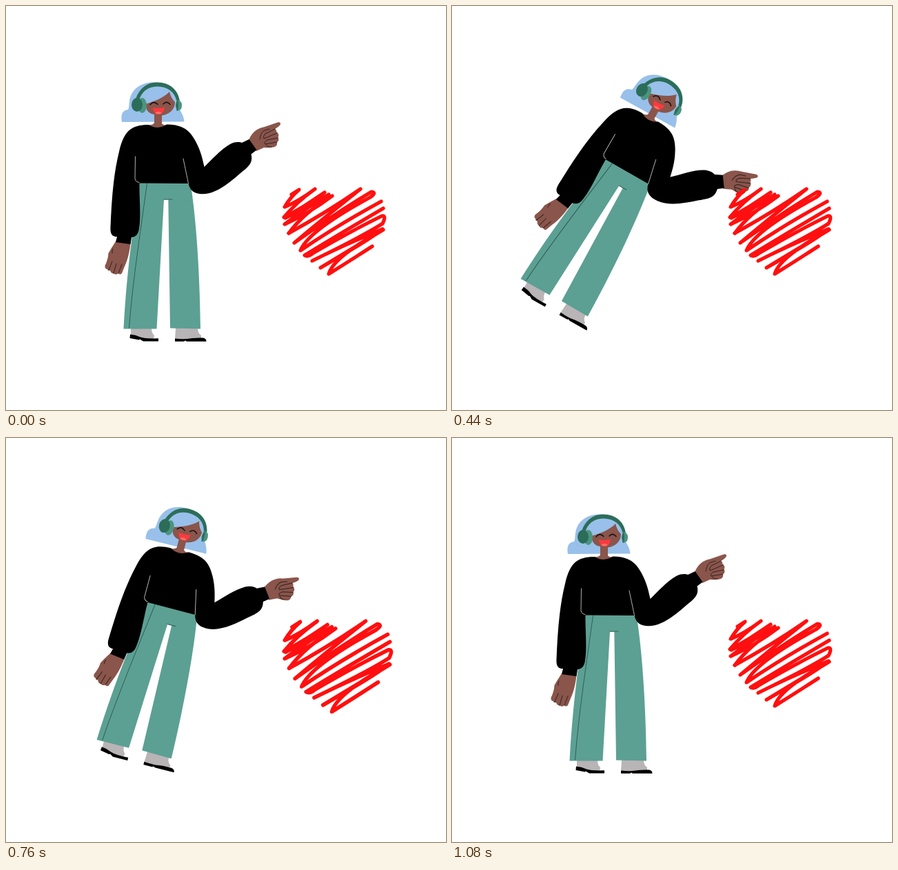
Write an HTML page that moves like this. It is 638 by 585 pixels and loops after 1120 ms.

```html
<!DOCTYPE html>
<html lang="en">
<head>
<meta charset="utf-8">
<title>Touch the heart</title>
<style>
  html, body { margin: 0; width: 100%; height: 100%; overflow: hidden; background: #fff; }
  svg { display: block; width: 638px; height: 585px; }
  .skin { fill: #8a554b; }
  .knit { fill: #000; }
  .hair { fill: #98c0ea; }
  .cloth { fill: #5ca093; }
  .sock { fill: #b9b4b6; }
  .dark { fill: #2c6d5a; }
  .pad { fill: #4b947f; }
  .line { fill: none; stroke-linecap: round; stroke-linejoin: round; }
  .crease { stroke: #2f2220; stroke-width: 1; }
  .seam { stroke: #2e5f55; stroke-width: 1; }
  .fold { stroke: #b5b0ae; stroke-width: 1; }
  .eye { stroke: #1a1110; stroke-width: 1.6; }
  .scribble { stroke: #ff0f0f; stroke-width: 5.2; }
</style>
</head>
<body>
<svg viewBox="0 0 638 585">
  <g id="figure">
    <!-- legs -->
    <path class="sock" d="M181 466H211Q211 474 215 477L214 483 181 479Z"/>
    <path class="knit" d="M180 475.500Q188 476 195 479.500 202 482 221 481.300V485.500H199L194 482.500 193 483.500 179.500 481Z"/>
    <path class="sock" d="M246 466H278Q278 474 283 477V483H245Z"/>
    <path class="knit" d="M245 481.500Q254 482.500 262 482 272 480 286 480.500 290.500 481.500 290.500 485.800H262L260 484.500 258 485.800H245Z"/>
    <path class="cloth" d="M193 254H267C275 300 281 380 282 467.500L238 466.500 235.300 280.500H229L218.500 467.500 170.500 467.500C173 420 177 380 182 340Z"/>
    <path class="line seam" d="M204.500 257C196 320 184 395 178.500 466M229 280H241"/>

    <!-- head -->
    <path class="hair" d="M168 168C166 157 169 151 177 150 179 146 178 143 179 138 181 121 195 110.500 214 110.500 236 110 248 121 250 140 250 152 257 154 258.500 167.500Z"/>
    <path class="skin" d="M202 142C215 138 229 133 237 124 239 132 242 136 245 139 245 150 237 157 226 158.500L226 170Q227 172 232 172.500L231 180H208L207 172.500Q214 172 215 169V157C208 156 203 152 202 142Z"/>
    <path class="dark" d="M188 135C193 119 205 110.500 219 110.500 238 110.500 250 122 252 138H247.500C245 125 235 116.500 219 116.500 206 117 196 124 193 137Z"/>
    <ellipse class="pad" cx="197.500" cy="144" rx="6.500" ry="11"/>
    <ellipse class="dark" cx="190" cy="143" rx="8" ry="10"/>
    <path class="pad" d="M247 136Q255 136 255 144 255 152 247 152Z"/>
    <path class="dark" d="M249 136Q243 144 249 152 251 144 249 136Z"/>
    <path class="line eye" d="M209 143Q214 136.500 220 142.500M228 142Q233 136.500 238 142.500"/>
    <path fill="#fb3a3e" d="M212.500 147Q221 149 230 146.500 229 157 221 157 214 156.500 212.500 147Z"/>
    <path fill="#ff7068" d="M216 155Q221 151 226 155 221 158 216 155Z"/>

    <!-- hands -->
    <path class="skin" d="M159 341L180.500 344C179 356 177 366 172 377L168 387Q165 390 163 387 160 390 156 387.500 152 387 151 383 147 384 147 381 143 381 143.500 376 148 367 148.500 358 153 350 159 341Z"/>
    <path class="line crease" d="M155 352Q153 355 154 358M154 370L149 382M160 373L156 387M168 374L163 387"/>
    <path class="skin" d="M352 194Q356 184 364 179 369 176 375 175L394 168.500Q398 167.500 398 171 397 174 390 178 393 180 392 182 397 186 394.500 190 397 195 393 197 394 203 388 204.500 380 205.500 374 205L363 210Z"/>
    <path class="line crease" d="M368 193Q369 184 374 180.500L382 178M390 178L376 185Q372 189 374 192L393 184M394 191L379 194Q373 198 376 200L393 197M377 201Q379 205 385 204"/>

    <!-- jumper -->
    <path class="knit" d="M207 172Q220 180 233 171.500C254 172 265 177 275 196 283 211 285 222 287.500 233 299 222 311 208 325 200 333 196 339 197 342 198L352.500 193 363.500 208.500 355.500 214.500C358 226 354 231 340 242 324 256 307 270 289 272 275 273 267 269 264.500 257L193.500 256.500C193 276 196 304 193 322 192 330 189 334 182 335L180.500 345 159 342 161 334C153 334 151 329 151.500 320 153 286 155 247 164 211 171 181 181 172 207 172Z"/>
    <path class="line fold" d="M187.500 218L187 250Q188 255 193 255.500M257 221L264.500 257"/>
  </g>

  <g id="heart" class="line scribble">
    <!-- left lobe -->
    <path d="M414 273L425 266Q412 277 404 291 424 283 448 265 420 285 403 306 434 290 462 270 428 293 405 307 436 292 468 273 430 296 404 316 440 300 473 275 432 299 410 329"/>
    <!-- long strokes -->
    <path d="M410 329Q468 297 514 265 462 306 418 343 478 300 530 269 538 270 528 277 438 326 427 354 480 318 544 283"/>
    <path d="M547 293Q484 330 433 361 438 364 445 358 500 326 545 304 552 303 546 315 520 332 444 369 490 346 546 323 528 338 456 379 504 350 547 324 474 364 468 388 500 368 531 348"/>
  </g>
</svg>
<script>
  const LOOP = 1120, STEP = 40;
  const figure = document.getElementById('figure');
  const heart = document.getElementById('heart');

  // [time, value] stops
  const lean = [[0, 0], [80, 1.2], [160, 5.2], [300, 17.1], [440, 29.3], [520, 34.4],
    [600, 31.1], [760, 14.15], [920, 0.9], [980, 0], [LOOP, 0]];
  const beat = [[0, 1], [495, 1], [672, 1.33], [782, 1], [955, 1.33], [1068, 1], [LOOP, 1]];

  const span = (stops, t) => stops.findIndex((s, i) => i > 0 && t <= s[0]);

  function linear(stops, t) {
    const i = span(stops, t), [t0, a] = stops[i - 1], [t1, b] = stops[i];
    return a + (b - a) * (t - t0) / (t1 - t0);
  }

  // Slope at a stop; flat at extremes and plateaus
  function slope(stops, i) {
    if (i === 0 || i === stops.length - 1) return 0;
    const rate = k => (stops[k][1] - stops[k - 1][1]) / (stops[k][0] - stops[k - 1][0]);
    const a = rate(i), b = rate(i + 1);
    return a * b <= 0 ? 0 : 2 * a * b / (a + b);
  }

  function smooth(stops, t) {
    const i = span(stops, t), [t0, a] = stops[i - 1], [t1, b] = stops[i];
    const d = t1 - t0, u = (t - t0) / d, v = 1 - u;
    return a * v * v * (1 + 2 * u) + b * u * u * (3 - 2 * u)
      + d * u * v * (v * slope(stops, i - 1) - u * slope(stops, i));
  }

  function draw(now) {
    const t = Math.floor(now % LOOP / STEP) * STEP;
    const s = linear(beat, t);
    figure.setAttribute('transform', `rotate(${smooth(lean, t)} 273.6 295.6)`);
    heart.setAttribute('transform', `translate(401 262) scale(${s}) translate(-401 -262)`);
  }

  const start = performance.now();
  function tick() {
    draw(performance.now() - start);
    requestAnimationFrame(tick);
  }
  tick();
</script>
</body>
</html>
```
